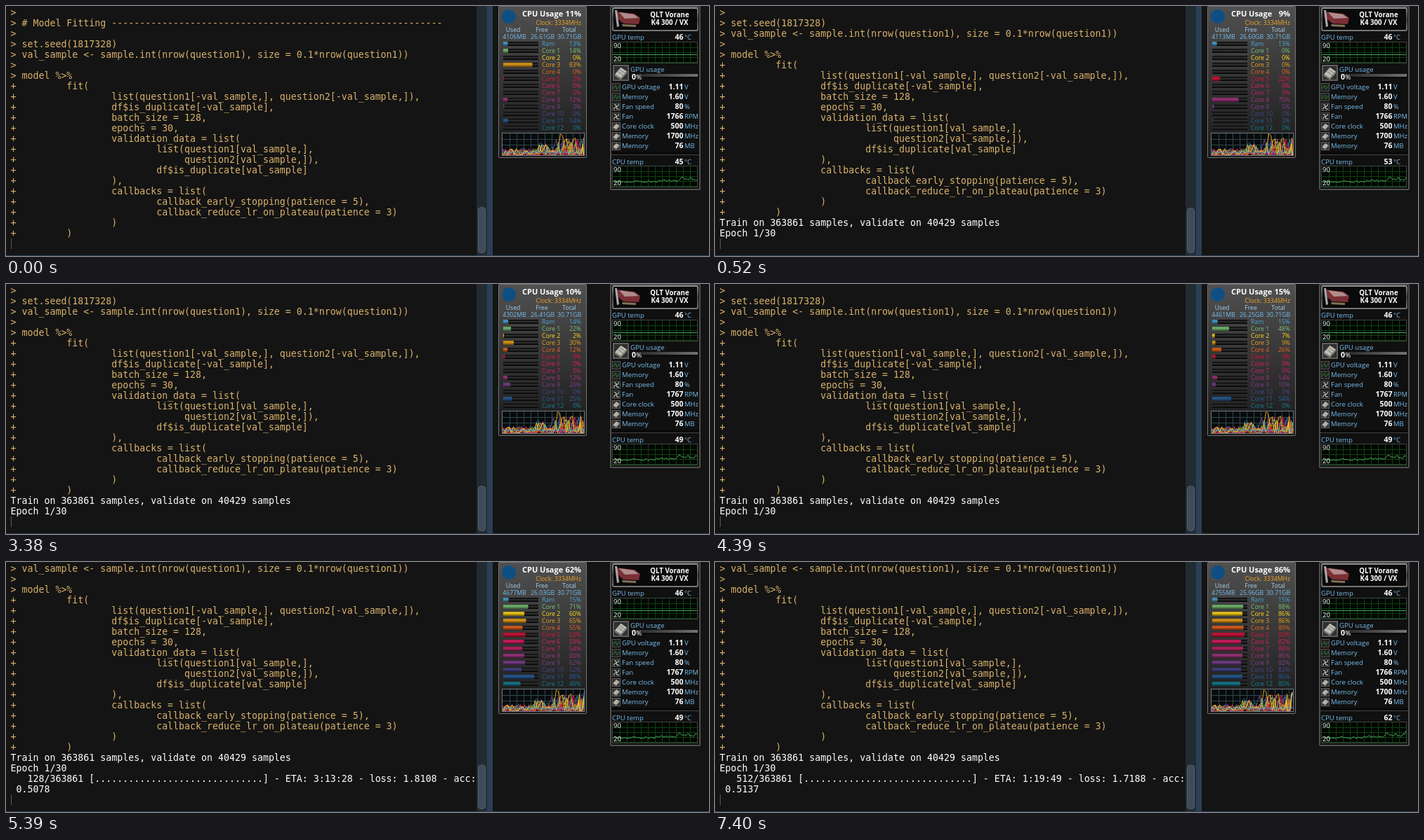
An HTML page for the animation above (8000 ms loop, 1001 by 357 pixels).

```html
<!DOCTYPE html>
<html lang="en">
<head>
<meta charset="utf-8">
<title>Model training</title>
<style>
  html, body { margin: 0; width: 100%; height: 100%; overflow: hidden; background: #141414; }
  svg { display: block; }
  text { white-space: pre; font: 8.7px "Open Sans", "Noto Sans", sans-serif; }
  .term text { font: 13.288px "DejaVu Sans Mono", monospace; }
  .bold { font-weight: 700; }
</style>
</head>
<body>
<svg id="stage" width="1001" height="357" viewBox="0 0 1001 357">
  <defs>
    <linearGradient id="panel" x2="0" y2="1">
      <stop stop-color="#505050"/><stop offset="1" stop-color="#191919"/>
    </linearGradient>
    <linearGradient id="track" x2="0" y2="1">
      <stop stop-color="#080808"/><stop offset=".5" stop-color="#3a3a3a"/><stop offset="1" stop-color="#050505"/>
    </linearGradient>
    <linearGradient id="shine" x2="0" y2="1">
      <stop stop-color="#000" stop-opacity=".2"/><stop offset=".4" stop-color="#000" stop-opacity=".1"/>
      <stop offset="1" stop-color="#000" stop-opacity=".6"/>
    </linearGradient>
    <linearGradient id="silver" x2="0" y2="1">
      <stop stop-color="#8a8a8a"/><stop offset=".5" stop-color="#444"/><stop offset="1" stop-color="#777"/>
    </linearGradient>
    <linearGradient id="strip">
      <stop stop-color="#222"/><stop offset=".5" stop-color="#484848"/><stop offset="1" stop-color="#737373"/>
    </linearGradient>
  </defs>
</svg>
<script>
const LOOP = 8000;
const stage = document.getElementById('stage');

function add(tag, attrs, parent = stage) {
  const el = document.createElementNS('http://www.w3.org/2000/svg', tag);
  for (const key in attrs) el.setAttribute(key, attrs[key]);
  return parent.appendChild(el);
}
const rect = (x, y, width, height, fill, more) => add('rect', { x, y, width, height, fill, ...more });
const path = (d, stroke, more) => add('path', { d, stroke, fill: 'none', ...more });
function label(x, y, str, fill, more, parent) {
  const el = add('text', { x, y, fill, ...more }, parent);
  el.textContent = str;
  return el;
}
const end = { 'text-anchor': 'end' };
const middle = { 'text-anchor': 'middle' };
const bold = size => ({ class: 'bold', style: `font-size:${size}px` });
const sized = size => ({ style: `font-size:${size}px` });

function grid(x, y, w, h, dx, dy, stroke) {
  let d = '';
  for (let i = dx; i < w; i += dx) d += `M${x + i + .5} ${y}v${h}`;
  for (let j = dy; j < h; j += dy) d += `M${x} ${y + j + .5}h${w}`;
  path(d, stroke);
}
function noise(a, b) {
  const s = Math.sin(a * 127.1 + b * 311.7) * 43758.5453;
  return s - Math.floor(s);
}
const stepAt = (times, t) => times.filter(at => at <= t).length;
const polyline = points => 'M' + points.map(p => p.map(n => n.toFixed(1)).join(' ')).join('L');

// Console
const TAN = '#d9b26c', WHITE = '#fff';
const ROWS = 22;
const more = (indent, code) => '+' + ' '.repeat(indent - 1) + code;
const script = [
  '>', '> # Model Fitting ' + '-'.repeat(59), '>',
  '> set.seed(1817328)',
  '> val_sample <- sample.int(nrow(question1), size = 0.1*nrow(question1))',
  '>', '> model %>%',
  more(10, 'fit('),
  more(18, 'list(question1[-val_sample,], question2[-val_sample,]),'),
  more(18, 'df$is_duplicate[-val_sample],'),
  more(18, 'batch_size = 128,'),
  more(18, 'epochs = 30,'),
  more(18, 'validation_data = list('),
  more(26, 'list(question1[val_sample,],'),
  more(31, 'question2[val_sample,]),'),
  more(26, 'df$is_duplicate[val_sample]'),
  more(18, '),'),
  more(18, 'callbacks = list('),
  more(26, 'callback_early_stopping(patience = 5),'),
  more(26, 'callback_reduce_lr_on_plateau(patience = 3)'),
  more(18, ')'),
  more(10, ')')
];
// The heading is a comment without a prompt of its own on the stage's left edge.
script[1] = script[1].replace('> #', '> #');
const output = ['Train on 363861 samples, validate on 40429 samples', 'Epoch 1/30'];
const progress = [
  [128, '3:13:28', '1.8108', '0.5078'],
  [256, '2:02:41', '1.7724', '0.5195'],
  [384, '1:32:23', '1.7487', '0.5234'],
  [512, '1:19:49', '1.7188', '0.5137']
];
const consoleTimes = [440, 520, 4620, 5470, 6320, 7170];

const term = add('g', { class: 'term' });
const rows = Array.from({ length: ROWS }, (_, i) => label(6.5, 14 + 15 * i, '', TAN, {}, term));
rect(7, 332, 1, 15, '#5a5a5a');
rect(670, 0, 15, 356, '#232b32');
const thumb = rect(672.5, 287, 10, 66, '#3f4c58', { rx: 4, stroke: '#52606d' });
rect(685, 0, 8, 357, '#2b4055');
rect(0, 356, 1001, 1, '#2b4055');

function drawConsole(step) {
  const lines = script.concat(output.slice(0, step));
  if (step > 2) {
    const [done, eta, loss, acc] = progress[step - 3];
    lines.push(`   ${done}/363861 [${'.'.repeat(30)}] - ETA: ${eta} - loss: ${loss} - acc:`, ' ' + acc);
  }
  const first = lines.length - ROWS;
  rows.forEach((row, i) => {
    row.textContent = lines[first + i];
    row.setAttribute('fill', first + i < script.length ? TAN : WHITE);
  });
  const top = 287.5 + first * .6;
  thumb.setAttribute('y', top);
  thumb.setAttribute('height', 352.5 - top);
}

// CPU panel
const BLUE = '#78bdec';
const colors = ['#4ba6d6', '#79c274', '#ffd91c', '#eda21a', '#e8641f', '#dc143c', '#dc1f62',
  '#c42468', '#a23680', '#7c4190', '#47478a', '#285f9a', '#177f92'];
// usage, used MB, then RAM and the twelve cores in percent
const cpuStates = [
  [11, 4106, 13, 14, 0, 83, 0, 2, 0, 0, 12, 3, 0, 14, 0],
  [9, 4113, 13, 0, 0, 0, 0, 22, 0, 0, 75, 5, 0, 2, 0],
  [9, 4136, 13, 5, 0, 28, 0, 9, 0, 0, 40, 20, 0, 2, 0],
  [9, 4161, 14, 2, 0, 59, 0, 2, 0, 0, 8, 38, 0, 0, 0],
  [10, 4302, 14, 22, 2, 30, 12, 5, 0, 0, 12, 20, 0, 25, 0],
  [15, 4461, 15, 48, 7, 9, 26, 9, 0, 0, 14, 10, 0, 54, 0],
  [62, 4677, 15, 71, 60, 65, 55, 63, 59, 54, 60, 62, 52, 88, 49],
  [85, 4521, 15, 88, 83, 88, 91, 89, 86, 82, 86, 88, 70, 91, 73],
  [86, 4755, 15, 88, 86, 86, 89, 92, 82, 88, 86, 82, 82, 86, 80]
];
const cpuTimes = [360, 1370, 2380, 3380, 4390, 5390, 6400, 7400];

rect(701.5, .5, 125, 216, 'url(#panel)', { stroke: '#747474', rx: 1 });
add('circle', { cx: 716, cy: 15, r: 10, fill: '#0d4f85' });
label(735, 15, 'CPU Usage', '#fff', bold(11));
const usage = label(819, 15, '', '#fff', { ...end, ...bold(11) });
label(819, 27, 'Clock: 3334MHz', '#f0a326', end);
['Used', 'Free', 'Total'].forEach((name, i) => label([722, 763, 802][i], 37, name, '#a3cfea', middle));
const used = label(724, 47, '', BLUE, middle);
const free = label(764, 47, '', BLUE, middle);
label(802, 47, '30.71GB', BLUE, middle);

const meters = colors.map((color, i) => {
  const y = 54 + 10 * i;
  rect(708, y - 3, 50, 6, 'url(#track)');
  const fill = rect(708, y - 3, 0, 6, color);
  rect(708, y - 3, 50, 6, 'url(#shine)');
  label(763, y + 3, i ? 'Core ' + i : 'Ram', color);
  return { fill, text: label(819, y + 3, '', color, end) };
});
rect(706.5, 181.5, 117, 32, '#080b0c', { stroke: '#6d7a80' });
grid(707, 182, 116, 31, 10, 8, '#2f464d');
// Later cores lie underneath.
const traces = colors.map(() => path('', '')).reverse();
traces.forEach((trace, core) => trace.setAttribute('stroke', colors[core]));

// Load of a core at sample i; samples before the start are seeded noise.
function load(core, i) {
  if (i >= 0) return cpuStates[i][core + 2];
  if (!core) return 13;
  const k = Math.floor(i / 3), f = i / 3 - k;
  const main = core === 2 || core === 3;
  const spike = n => noise(core, n) ** (main ? 1.6 : 3);
  const peak = i > -45 ? (main ? 105 : 80) : i > -65 ? 60 : 32;
  return peak * (spike(k) * (1 - f) + spike(k + 1) * f);
}

function drawCpu(step) {
  const [total, mb, ...loads] = cpuStates[step];
  usage.textContent = total + '%';
  used.textContent = mb + 'MB';
  free.textContent = (30.7115 - mb / 1000).toFixed(2) + 'GB';
  meters.forEach(({ fill, text }, i) => {
    fill.setAttribute('width', loads[i] / 2);
    text.textContent = loads[i] + '%';
  });
  traces.forEach((trace, core) => {
    const points = Array.from({ length: 116 }, (_, n) => [707.5 + n, 212.5 - load(core, step - 115 + n) * .29]);
    trace.setAttribute('d', polyline(points));
  });
}

// GPU panel
const temps = [45, 53, 49, 62];
const gpuTimes = [130, 3150, 6090];

rect(861, 1, 127, 261, '#101010', { stroke: '#4f4f4f', 'stroke-width': 2, rx: 1 });
rect(864, 3, 121, 32, '#0a0a0a', { stroke: 'url(#silver)', 'stroke-width': 2, rx: 2 });
add('path', { d: 'M869 8l26 3 8 6-2 9-22-1-9-8z', fill: '#7a2f35' });
add('path', { d: 'M873 9l21 3 7 5-20 1z', fill: '#b08c8c' });
add('path', { d: 'M867 6h3l3 23-3 1z', fill: '#a9a9a9' });
add('path', { d: 'M877 26l20 1v3l-19-1z', fill: '#857257' });
label(945, 16, 'QLT Vorane', '#fff', { ...middle, ...bold(9.7) });
label(945, 27, 'K4 300 / VX', '#fff', { ...middle, ...bold(9.7) });

function reading(x, y, name, value, unit) {
  label(x, y, name, BLUE, sized(9.6));
  label(966, y, unit, BLUE, sized(9.4));
  return label(964.5, y, value, '#fff', { ...end, ...bold(10.5) });
}
function tempGraph(y) {
  rect(863.5, y - .5, 121, 30, '#030603', { stroke: '#3d453d' });
  grid(864, y, 120, 29, 10, 7, '#0b430f');
  const line = path('', '#48a05a');
  label(865, y + 8, '90', '#fff', sized(9.5));
  label(865, y + 27, '20', '#fff', sized(9.5));
  return line;
}
function chip(x, y, size) {
  const g = add('g', { transform: `translate(${x} ${y}) scale(${size / 12})` });
  add('rect', { x: .5, y: .5, width: 11, height: 11, fill: '#303030', stroke: '#606060' }, g);
  add('path', { d: 'M1.5 7L6 2l4.5 3L6 10z', fill: '#bdbdb5' }, g);
  add('path', { d: 'M1.5 7v1.5L6 11.2v-1.4zM6 9.8l4.5-4.8v1.4L6 11.2z', fill: '#77776f' }, g);
  add('path', { d: 'M4 5l4 3M5.3 3.6l4 2.8', stroke: '#85857c', 'stroke-width': .6 }, g);
}
function smallIcon(kind, y) {
  if (kind === 'chip') return chip(863, y, 12);
  rect(863.5, y + .5, 11, 11, '#202320', { stroke: '#505050' });
  if (kind === 'wave') path(`M864 ${y + 7}h2l2-4 2 6 2-4h2`, '#267031');
  else path(`M866 ${y + 3}q3-1 3 3t4 3M872 ${y + 2}q1 3-3 4t-3 4`, '#c9c9c9', { 'stroke-width': 1.2 });
}

reading(863, 48, 'GPU temp', '46', '°C');
tempGraph(52).setAttribute('d', 'M864 69.5h120');
chip(864, 84, 23);
label(889, 94, 'GPU usage', BLUE, sized(9.6));
rect(889, 97, 96, 7, '#0b0b0b');
rect(890, 97, 95, 4, 'url(#strip)');
label(891, 105, '0', '#fff', bold(10.5));
label(897.5, 105, '%', '#fff', sized(9.6));

const readings = [
  ['wave', 'GPU voltage', '1.11', 'V'],
  ['wave', 'Memory', '1.60', 'V'],
  ['fan', 'Fan speed', '80', '%'],
  ['fan', 'Fan', '1766', 'RPM'],
  ['chip', 'Core clock', '500', 'MHz'],
  ['chip', 'Memory', '1700', 'MHz'],
  ['chip', 'Memory', '76', 'MB']
].map(([icon, ...texts], i) => {
  smallIcon(icon, 110 + 14 * i);
  return reading(877, 119 + 14 * i, ...texts);
});
const fan = readings[3];
rect(862, 208, 125, 4, '#0a0a0a');
rect(862, 212, 125, 1, '#444');
const cpuTemp = reading(863, 226, 'CPU temp', '', '°C');
const tempLine = tempGraph(229);

function temperature(i) {
  if (i >= 0) return temps[i];
  return (i > -13 ? 46 : i > -28 ? 41 : 37) + (noise(3, i) - .4) * (i > -13 ? 14 : 7);
}

function drawGpu(step) {
  cpuTemp.textContent = temps[step];
  fan.textContent = step === 2 ? '1767' : '1766';
  const points = Array.from({ length: 61 }, (_, n) => [864 + 2 * n, 258 - (temperature(step - 60 + n) - 20) * .4]);
  tempLine.setAttribute('d', polyline(points));
}

const parts = [
  { times: consoleTimes, draw: drawConsole },
  { times: cpuTimes, draw: drawCpu },
  { times: gpuTimes, draw: drawGpu }
];
const start = performance.now();
function frame() {
  const t = (performance.now() - start) % LOOP;
  for (const part of parts) {
    const step = stepAt(part.times, t);
    if (step !== part.step) part.draw(part.step = step);
  }
  requestAnimationFrame(frame);
}
frame();
</script>
</body>
</html>
```
